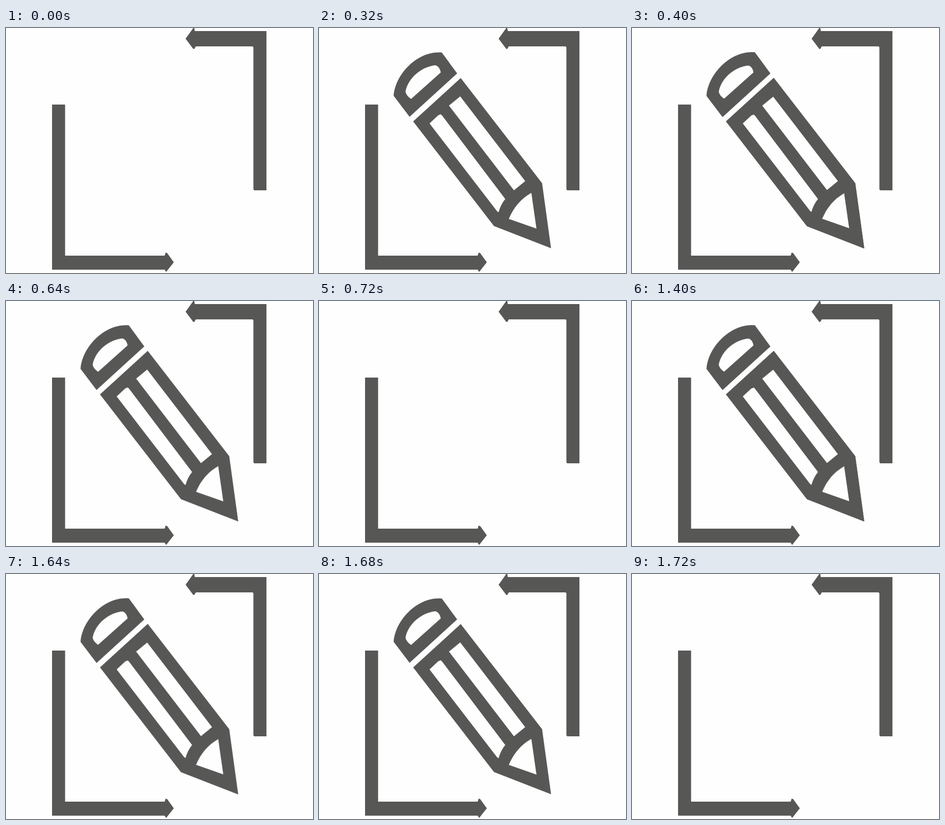
These frames come from a looping animation (600x480 px, 2 s). An HTML page without scripts:

```html
<!DOCTYPE html>
<html lang="en">
<head>
<meta charset="utf-8">
<title>Edit icon</title>
<style>
  html, body { margin: 0; width: 100%; height: 100%; overflow: hidden; background: #fefefe; }
  svg { display: block; width: 100%; height: 100%; fill: #575756; }
  .pencil {
    fill-rule: evenodd;
    stroke: #575756;
    stroke-width: 0;
    visibility: hidden;
    animation: blink 2s step-end infinite, edge 2s step-end infinite;
  }
  @keyframes blink {
    0%, 36%, 86% { visibility: hidden; }
    16%, 66% { visibility: visible; }
  }
  /* the outline firms up just after appearing and thins before vanishing */
  @keyframes edge {
    0%, 16%, 34%, 66%, 84% { stroke-width: 0; }
    18%, 32%, 68%, 82% { stroke-width: .6px; }
    20%, 70% { stroke-width: 1px; }
    30%, 80% { stroke-width: .8px; }
  }
</style>
</head>
<body>
<svg viewBox="0 0 600 480">
  <path d="M90 150H115.500V446H310L312 440L315 441L328 459L313 478L310 473.500H90Z"/>
  <path d="M509 6V318H485L483.500 316V38L482 36H371L368 41H366L351 21L366 0H368L369 6Z"/>
  <g class="pencil">
    <path d="M240 48L270 89L177 174L146 133C149 90 193 44 240 48Z
             M228 73C202 75 174 97 169 125Q171 133 180 139L238 87Q236 76 228 73Z"/>
    <path d="M277 98L436 304L453.500 431.500L342 388L184 183Z
             M216 187L233 171L238 169L241 172L364 335Q355 346 351 361L348 359Z
             M254 152L276 134L403 300L381 318Z
             M415 323L425 393L371 374Q385 340 415 323Z"/>
  </g>
</svg>
</body>
</html>
```
